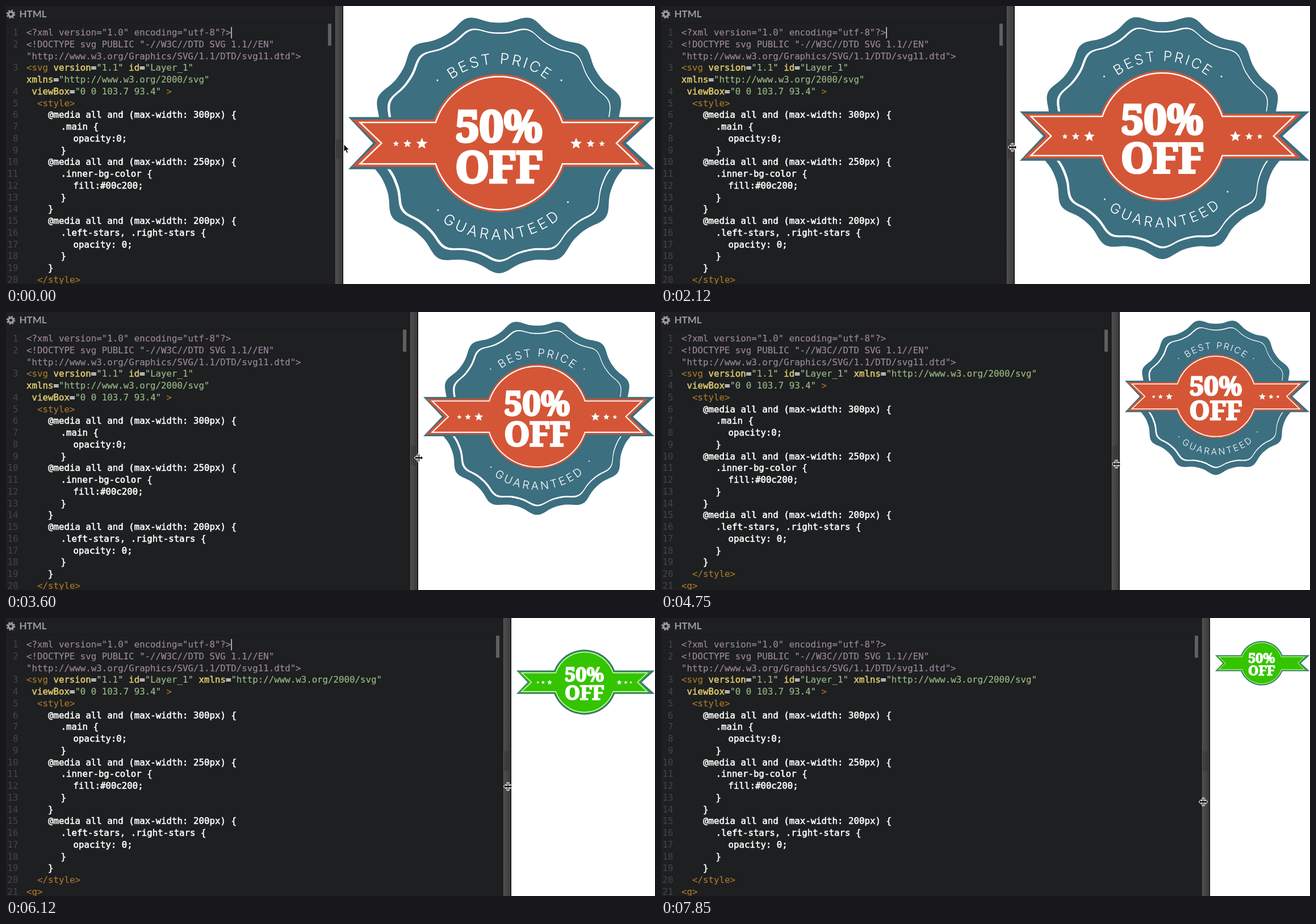
An HTML page for the animation above (8000 ms loop, 1143 px wide and 490 px high).

```html
<!DOCTYPE html>
<html lang="en">
<head>
<meta charset="utf-8">
<style>
  html, body { margin: 0; width: 100%; height: 100%; overflow: hidden; background: #1d1f20; }
  svg { display: block; }
  .code { font: 15.75px "DejaVu Sans Mono", monospace; white-space: pre; }
  .n { fill: #434546; text-anchor: end; }
  .p { fill: #9c859b; stroke: #9c859b; stroke-width: .2px; }
  .b { fill: #a8762c; stroke: #a8762c; stroke-width: .2px; }
  .g { fill: #98b887; stroke: #98b887; stroke-width: .2px; }
  .y { fill: #e0cc70; stroke: #e0cc70; stroke-width: .5px; }
  .w { fill: #fff; stroke: #fff; stroke-width: .55px; }
  .arc { font: 300 26px Inter, Roboto, sans-serif; fill: #fff; text-anchor: middle; }
  .big { font: bold 76px "Noto Serif", serif; fill: #fff; stroke: #fff; stroke-width: 4.4px; text-anchor: middle; }
</style>
</head>
<body>
<svg width="1143" height="490">
  <defs>
    <linearGradient id="metal"><stop stop-color="#505050"/><stop offset="1" stop-color="#3a3a3a"/></linearGradient>
    <path id="upper" d="M-140 0A140 140 0 0 1 140 0"/>
    <path id="lower" d="M-170.5 0A170.5 170.5 0 0 0 170.5 0"/>
  </defs>
  <rect width="1143" height="490" fill="#1d1f20"/>
  <rect y="30" width="1143" height="1" fill="#17191a"/>
  <g transform="translate(8.5 14.5)" fill="none" stroke="#999">
    <circle r="4.3" stroke-width="3.4"/>
    <circle r="6.5" stroke-width="2.6" stroke-dasharray="2.7 2.405"/>
  </g>
  <text x="23.5" y="20.3" fill="#9b9d9d" style="font:bold 17px Lato,sans-serif">HTML</text>
  <g id="narrow" class="code"></g>
  <g id="wide" class="code"></g>
  <rect id="caret" x="396.5" y="37" width="1.2" height="20" fill="#fff"/>
  <g id="pane">
    <rect x="-27" y="31" width="6" height="39" fill="#5d5f60"/>
    <rect x="-16" width="16" height="490" fill="#141414"/>
    <rect x="-14.5" width="13" height="490" fill="url(#metal)"/>
    <path d="M-11.5 235v35m3-35v35m3-35v35" stroke="#2a2a2a"/>
    <rect width="1143" height="490" fill="#fff"/>
  </g>
  <g id="badge"></g>
  <g stroke="#fff" stroke-linejoin="round">
    <path id="arrow" d="M0 0V13.5L3 10.7 5.2 15.8 7.6 14.8 5.4 9.8H9.6Z"/>
    <path id="resize" paint-order="stroke" stroke-width="2"
      d="M-7 0L-4 -3V-1H-1.6V-6.5H-.6V-1H.6V-6.5H1.6V-1H4V-3L7 0 4 3V1H1.6V6.5H.6V1H-.6V6.5H-1.6V1H-4V3Z"/>
  </g>
</svg>
<script>
const $ = id => document.getElementById(id);
const TEAL = '#3c6f80', ORANGE = '#d45637', GREEN = '#34c400';

// Code panel: rows of [line number, x, ...tokens]; a token starts with its colour class
const svgTag = ['b<svg ', 'yversion', 'w=', 'g"1.1" ', 'yid', 'w=', 'g"Layer_1"'];
const xmlns = ['yxmlns', 'w=', 'g"http://www.w3.org/2000/svg"'];

function codeMarkup(wide) {
  const rows = [
    [1, 36, 'p<?xml version="1.0" encoding="utf-8"?>'],
    [2, 36, 'p<!DOCTYPE svg PUBLIC "-//W3C//DTD SVG 1.1//EN"'],
    ['', 36, 'p"http://www.w3.org/Graphics/SVG/1.1/DTD/svg11.dtd">'],
    ...(wide ? [[3, 36, ...svgTag, 'w ', ...xmlns]] : [[3, 36, ...svgTag], ['', 36, ...xmlns]]),
    [4, 45.5, 'yviewBox', 'w=', 'g"0 0 103.7 93.4" ', 'b>'],
    [5, 55, 'b<style>']
  ];
  const css = [
    [74, '@media all and (max-width: 300px) {'], [96.5, '.main {'], [118.5, 'opacity:0;'], [96.5, '}'],
    [74, '@media all and (max-width: 250px) {'], [96.5, '.inner-bg-color {'], [118.5, 'fill:#00c200;'], [96.5, '}'],
    [74, '}'],
    [74, '@media all and (max-width: 200px) {'], [96.5, '.left-stars, .right-stars {'], [118.5, 'opacity: 0;'], [96.5, '}'],
    [74, '}']
  ];
  css.forEach(([x, text], i) => rows.push([6 + i, x, 'w' + text]));
  rows.push([20, 55, 'b</style>'], [21, 36, 'b<g>']);
  return rows.map(([n, x, ...tokens], i) => {
    const y = 52 + 20.76 * i;
    const spans = tokens.map(s => `<tspan class="${s[0]}">${s.slice(1).replace(/</g, '&lt;')}</tspan>`);
    return `<text class="n" x="21.5" y="${y}">${n}</text><text x="${x}" y="${y}">${spans.join('')}</text>`;
  }).join('');
}
$('narrow').innerHTML = codeMarkup(false);
$('wide').innerHTML = codeMarkup(true);

// Badge, drawn around the centre of its disc
const polygon = (count, point) => 'M' + Array.from({ length: count }, (_, i) => point(i).map(v => v.toFixed(2))).join('L') + 'Z';

// 13 lobes, slightly pointed outwards
const scallop = (radius, depth) => polygon(260, i => {
  const a = i * Math.PI / 130, r = radius + depth * (Math.cos(13 * a) + .15 * Math.cos(26 * a));
  return [r * Math.sin(a), r * Math.cos(a) + 1];
});

const star = (x, r) => polygon(10, i => {
  const a = i * Math.PI / 5, q = i % 2 ? r * .45 : r;
  return [x + q * Math.sin(a), 1 - q * Math.cos(a)];
});

// Disc with a swallow-tailed ribbon through it
function ribbon(r, h, tip, notch, tipR = tip, notchR = notch) {
  const x = Math.sqrt(r * r - h * h);
  return `M${-tip} ${-h}H${-x}A${r} ${r} 0 0 1 ${x} ${-h}H${tipR}L${notchR} 0L${tipR} ${h}H${x}` +
    `A${r} ${r} 0 0 1 ${-x} ${h}H${-tip}L${-notch} 0Z`;
}

const stars = [[181.5, 5.5], [161.5, 7.5], [136, 10.5]].map(([x, r]) => star(-x, r) + star(x, r)).join('');
const dots = [[-108.5, -111], [110, -111], [-107.5, 118], [121.5, 104]]
  .map(([x, y]) => `<circle cx="${x}" cy="${y}" r="1.5" fill="#fff"/>`).join('');
const arcText = (path, offset, spacing, text) =>
  `<text class="arc" letter-spacing="${spacing}"><textPath href="#${path}" startOffset="${offset}%">${text}</textPath></text>`;

$('badge').innerHTML = `
  <g id="main">
    <path d="${scallop(219.9, 7.5)}" fill="${TEAL}"/>
    <path d="${scallop(201.6, 6)}" fill="#fff"/>
    <path d="${scallop(198.4, 6)}" fill="${TEAL}" transform="translate(1.4 -.6)"/>
    ${dots}${arcText('upper', 50.4, 3.7, 'BEST PRICE')}${arcText('lower', 51.3, 5.3, 'GUARANTEED')}
  </g>
  <path d="${ribbon(127, 46, 265.5, 222, 274, 224)}" fill="${TEAL}"/>
  <path id="inner" d="${ribbon(122, 41.5, 259, 216)}"/>
  <path d="${ribbon(117.5, 36.5, 245, 207)}" fill="none" stroke="#fff" stroke-width="2.5"/>
  <path id="stars" d="${stars}" fill="#fff"/>
  <text class="big" y="-3">50%</text>
  <text class="big" y="69">OFF</text>`;

// The picture only changes at these times
const steps = [0, 150, 300, 450, 610, 770, 930, 1380, 1820, 1970, 2120, 2330, 2540, 2750, 2950, 3160, 3330,
  3600, 3780, 4010, 4250, 4520, 4750, 4900, 5080, 5260, 5450, 5600, 5770, 5940, 6120, 6270, 6440, 6620,
  6760, 6920, 7080, 7240, 7400, 7560, 7720, 7850];

// [time, divider x, pointer x, pointer y]
const drag = [[0, 594, 595, 243.5], [150, 594, 599, 245], [300, 594, 600, 246], [930, 594, 590, 248],
  [1700, 594, 590, 248], [2120, 623, 619, 249], [2950, 677, 676, 251], [3600, 726, 727, 257],
  [4750, 808, 802, 268], [6120, 890, 884, 297], [7850, 967, 955, 324]];

function pose(t) {
  const i = Math.max(1, drag.findIndex(k => k[0] >= t)), a = drag[i - 1], b = drag[i];
  const u = (t - a[0]) / (b[0] - a[0]);
  return a.map((v, j) => v + (b[j] - v) * u).slice(1);
}

const show = (id, on) => $(id).setAttribute('visibility', on ? 'visible' : 'hidden');
const place = (id, x, y, s = 1) => $(id).setAttribute('transform', `translate(${x} ${y}) scale(${s})`);

// The caret blinks every 528 ms; 216 ms of its first phase have passed at the start
const caretOn = t => Math.floor((t + 216) / 528) % 2 === 0;

function draw(now) {
  const time = now % 8000, t = steps.filter(s => s <= time).pop();
  const [x, px, py] = pose(t), divider = Math.round(x);
  const viewport = 1143 - divider, scale = (viewport - 9.5) / 540;
  place('pane', divider, 0);
  place('badge', divider + 9 + 265.5 * scale, 7.3 + 234.7 * scale, scale);
  place('arrow', px, py);
  place('resize', px, py);
  show('arrow', t < 450);
  show('resize', t >= 450);
  show('caret', caretOn(t));
  show('narrow', divider < 745);
  show('wide', divider >= 745);
  show('main', viewport > 304);
  show('stars', viewport > 203);
  $('inner').setAttribute('fill', viewport > 254 ? ORANGE : GREEN);
  requestAnimationFrame(draw);
}
requestAnimationFrame(draw);
</script>
</body>
</html>
```
